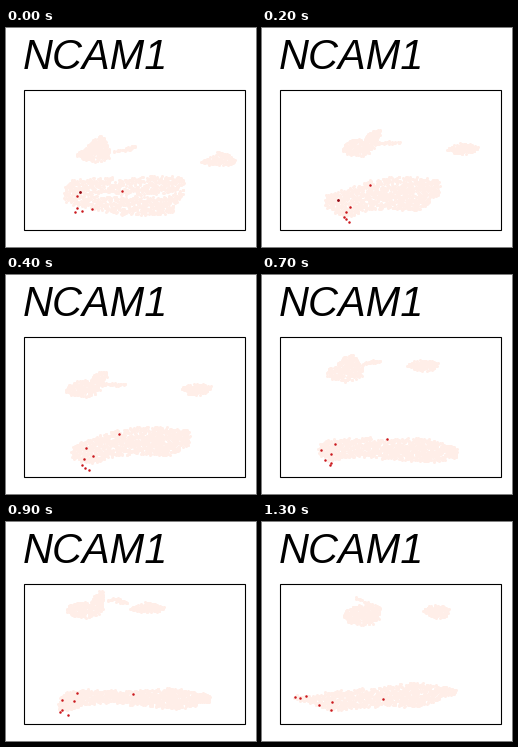
A matplotlib script that plays this animation: 250 px wide and 219 px high, repeating every 1500 ms.

```python
import numpy as np
import matplotlib.pyplot as plt
from matplotlib.animation import FuncAnimation
from matplotlib.patches import Rectangle

W, H, DPI = 250, 219, 100
STEP_MS, STEPS = 100, 15
STARTS = [0, 1, 2, 4, 5, 7, 9, 11, 13]  # step at which each view begins
PALE, RED, DARK = "#ffeee8", "#cb181d", "#8a0a16"
COUNTS = {"main": 1150, "crest": 290, "tail": 30, "side": 165}


def view(main, crest, tail, side, dots, gap=0.0):
    """Outlines are (x, top, bottom) knots; dots are (x, y)."""
    parts = dict(main=main, crest=crest, tail=tail, side=side, dots=dots)
    return {k: np.array(v, float) for k, v in parts.items()} | {"gap": gap}


def mix(a, b, t=0.5, **fixed):
    out = {k: a[k] * (1 - t) + b[k] * t for k in a}
    return out | {k: np.array(v, float) for k, v in fixed.items()}


A = view(
    [(57, 160, 172), (65, 151, 178), (90, 150, 181), (118, 151, 186),
     (150, 148, 187), (168, 148, 183), (179, 151, 162)],
    [(70, 125, 129), (80, 119, 133), (92, 106, 135), (97, 106, 134), (104, 123, 130)],
    [(106, 123, 125), (118, 120, 124), (124, 117, 123), (131, 115, 119)],
    [(195, 132, 136), (205, 127, 138), (212, 122, 138), (221, 125, 138), (229, 131, 137)],
    [(115, 162), (73, 163), (70, 167), (70, 179), (68, 183), (75, 182), (85, 180)],
    gap=1.5)
B = view(
    [(62, 166, 178), (72, 164, 186), (86, 160, 190), (100, 155, 184),
     (122, 148, 181), (155, 148, 184), (178, 151, 168)],
    [(80, 118, 124), (88, 111, 128), (102, 109, 129), (110, 101, 124), (119, 101, 105)],
    [(112, 114, 118), (120, 113, 117), (130, 113, 116), (140, 113, 116)],
    [(185, 119, 123), (194, 115, 127), (203, 114, 127), (210, 116, 125), (217, 119, 122)],
    [(107, 156), (75, 171), (87, 178), (83, 183), (81, 188), (83, 190), (86, 193)])
C = view(
    [(68, 176, 190), (77, 169, 190), (92, 163, 187), (110, 157, 181),
     (130, 154, 178), (165, 154, 180), (190, 157, 176)],
    [(38, 106, 112), (50, 101, 116), (66, 97, 116), (75, 89, 112), (84, 91, 95)],
    [(78, 102, 107), (86, 102, 105), (94, 103, 107), (103, 102, 104)],
    [(166, 102, 108), (173, 101, 115), (181, 101, 115), (188, 102, 113), (194, 102, 109)],
    [(118, 161), (84, 173), (85, 183), (72, 184), (70, 190), (73, 194), (78, 195)])
D = view(
    [(56, 168, 180), (66, 164, 187), (85, 163, 183), (105, 162, 182),
     (130, 163, 185), (165, 162, 188), (196, 172, 184)],
    [(64, 94, 102), (74, 90, 106), (84, 79, 107), (92, 78, 106), (101, 93, 102)],
    [(100, 88, 91), (106, 86, 89), (113, 85, 88), (120, 85, 87)],
    [(145, 88, 92), (153, 84, 96), (161, 84, 97), (169, 85, 96), (176, 87, 93)],
    [(124, 163), (72, 168), (68, 178), (58, 174), (62, 184), (68, 187), (67, 189)])
E = view(
    [(52, 176, 189), (60, 169, 190), (80, 167, 183), (105, 168, 181),
     (135, 167, 184), (170, 165, 188), (205, 172, 181)],
    [(60, 84, 91), (70, 80, 96), (85, 78, 96), (93, 67, 93), (98, 69, 88)],
    [(100, 78, 80), (108, 75, 80), (115, 76, 82), (123, 79, 83)],
    [(124, 85, 89), (134, 80, 91), (142, 79, 91), (150, 81, 91), (158, 84, 89)],
    [(126, 171), (70, 170), (67, 178), (55, 177), (55, 187), (53, 189), (61, 192)])
F = view(
    [(31, 172, 176), (48, 174, 182), (68, 169, 189), (95, 167, 187),
     (120, 164, 184), (155, 159, 186), (195, 166, 172)],
    [(81, 90, 96), (88, 85, 102), (100, 81, 104), (110, 82, 103), (118, 88, 97)],
    [(92, 74, 76), (97, 75, 79), (103, 79, 82), (120, 84, 89)],
    [(161, 86, 91), (167, 82, 95), (174, 82, 97), (181, 83, 97), (187, 85, 94)],
    [(120, 176), (69, 179), (68, 187), (43, 173), (37, 175), (32, 174), (56, 182)])
EF = mix(
    E, F,
    main=[(28, 174, 184), (45, 170, 188), (72, 168, 187), (100, 169, 182),
          (125, 166, 185), (165, 161, 188), (195, 166, 178)],
    dots=[(123, 174), (63, 174), (67, 183), (42, 174), (35, 181), (28, 181), (50, 188)])
VIEWS = [A, mix(A, B), B, mix(B, C), C, D, E, EF, F]


def fill(knots, n, seed, gap=0.0):
    """Spread n points evenly over the outline given by knots."""
    rng = np.random.default_rng(seed)
    along = (np.arange(n) * 0.6180339887 + 0.5) % 1
    across = rng.uniform(-1, 1, n)
    rough = rng.normal(0, 0.55, (n, 2))
    kx, top, bottom = knots.T
    gx = np.linspace(kx[0] + 1, kx[-1] - 1, 300)
    area = np.cumsum(np.interp(gx, kx, bottom - top))
    x = np.interp(along, (area - area[0]) / (area[-1] - area[0]), gx)
    hi, lo = np.interp(x, kx, top) + 1, np.interp(x, kx, bottom) - 1
    y = (hi + lo) / 2 + across * (lo - hi) / 2
    y += np.sign(across) * gap * np.clip((x - 80) / 15, 0, 1)
    return np.column_stack([x, y]) + rough


def cloud(v):
    return np.vstack([fill(v[k], n, seed, v["gap"] if k == "main" else 0)
                      for seed, (k, n) in enumerate(COUNTS.items())])


CLOUDS = [cloud(v) for v in VIEWS]

fig = plt.figure(figsize=(W / DPI, H / DPI), dpi=DPI, facecolor="white")
ax = fig.add_axes([0, 0, 1, 1])
ax.set(xlim=(0, W), ylim=(H, 0))
ax.axis("off")


def points(diameter, color, z):
    return ax.scatter([], [], s=(diameter * 72 / DPI) ** 2, c=color, linewidths=0, zorder=z)


cells = points(3.0, PALE, 1)
hits = points(2.5, RED, 2)
dark_hit = points(2.5, DARK, 3)
ax.add_patch(Rectangle((17.5, 61.5), 221, 140, fill=False, ec="black",
                       lw=1.1 * 72 / DPI, zorder=4))
ax.text(16.5, 41, "NCAM1", family="Liberation Sans", style="italic",
        size=41.5 * 72 / DPI, color="black", va="baseline")


def draw(step):
    i = np.searchsorted(STARTS, step, side="right") - 1
    dots = VIEWS[i]["dots"] + 0.5
    cells.set_offsets(CLOUDS[i])
    hits.set_offsets(dots)
    dark_hit.set_offsets(dots[1:2] if i < 3 else np.empty((0, 2)))
    return cells, hits, dark_hit


anim = FuncAnimation(fig, draw, frames=STEPS, interval=STEP_MS,
                     repeat=True, repeat_delay=0)
plt.show()
```
